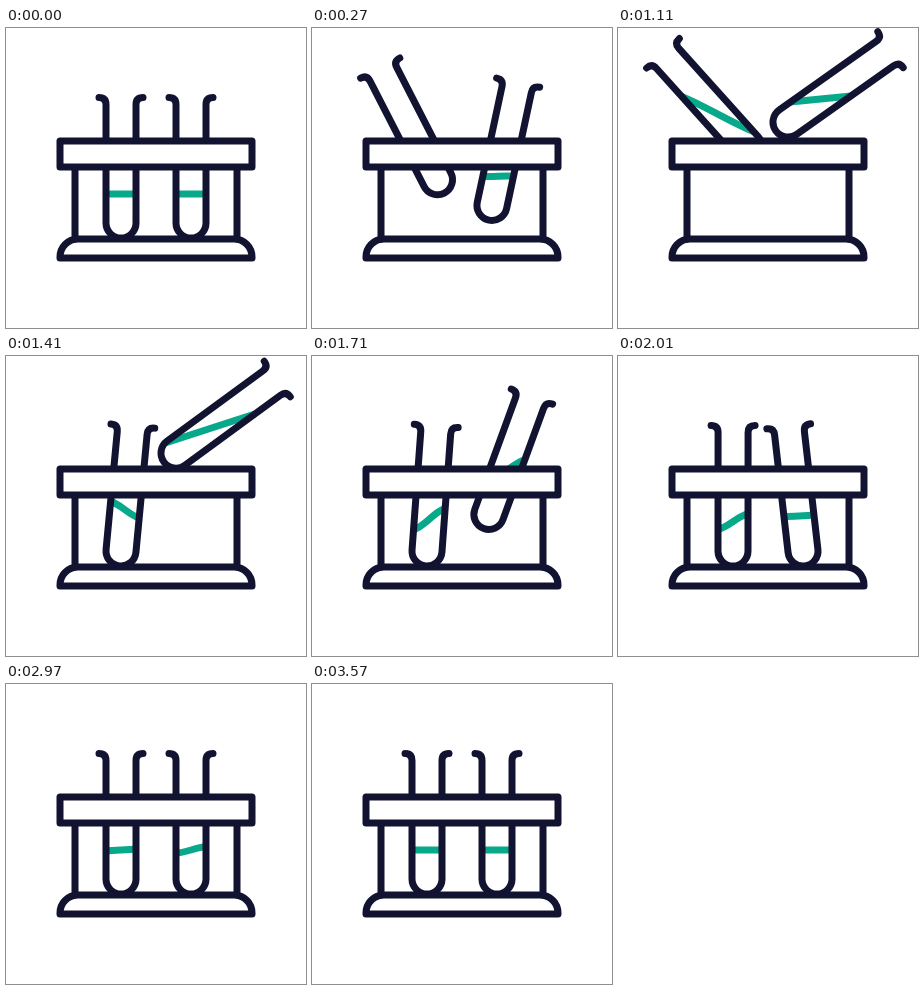
These frames come from a looping animation (300x300 px, 5.13 s). An HTML page:

```html
<!DOCTYPE html>
<html>
<head>
<meta charset="utf-8">
<title>Test tubes</title>
<style>
html, body { margin: 0; height: 100%; overflow: hidden; background: #fff; }
svg { display: block; width: 100%; height: 100%; }
path { fill: none; stroke: #121331; stroke-width: 7; stroke-linecap: round; stroke-linejoin: round; }
.liquid { stroke: #08a88a; stroke-linecap: butt; }
.plate { fill: #fff; }
</style>
</head>
<body>
<svg viewBox="0 0 300 300">
  <defs>
    <path id="glass" d="M-22-125.500q7 0 7 7V0a15 15 0 0 0 30 0V-118.500q0-7 7-7"/>
  </defs>
  <g><g class="tube"><path class="liquid"/><use href="#glass"/></g></g>
  <g transform="translate(300 0) scale(-1 1)"><g class="tube"><path class="liquid"/><use href="#glass"/></g></g>
  <path d="M69 139V211M231 139V211"/>
  <path d="M54 230v-1a18 18 0 0 1 18-18h156a18 18 0 0 1 18 18v1z"/>
  <path class="plate" d="M54 113H246V139H54z"/>
</svg>
<script>
const LOOP = 5130, STEP = 30;
const PEAK = 55, FALL = 885, LAND = 1348, SETTLE = 690;
const LAG = 456, DELAY = 55;

// [time, value] keys
const SLOSH = [[480, 0], [1360, 32], [1810, -42], [2400, 17], [2770, -7], [3114, 0]];
const LEVEL = [[0, 29], [900, 41], [1250, 45], [1710, 32], [2100, 29]];

const wave = u => (1 - Math.cos(Math.PI * u)) / 2;

function track(keys, t) {
  if (t <= keys[0][0]) return keys[0][1];
  for (let i = 1; i < keys.length; i++) {
    const [t0, v0] = keys[i - 1], [t1, v1] = keys[i];
    if (t < t1) return v0 + (v1 - v0) * wave((t - t0) / (t1 - t0));
  }
  return keys[keys.length - 1][1];
}

// Outward lean: swing out, drop back, overshoot, settle
function lean(t) {
  if (t < FALL) return PEAK * (1 - (1 - (t / FALL) ** 1.6) ** 4.2);
  if (t < LAND) return PEAK * (1 - ((t - FALL) / (LAND - FALL)) ** 2);
  const s = t - LAND, top = 110;
  if (s < top) return -7 * Math.sin(Math.PI / 2 * s / top);
  return s < SETTLE ? -7 * (1 - wave((s - top) / (SETTLE - top))) : 0;
}

function pose(tube, t) {
  const a = lean(t), out = Math.max(0, a);
  const lift = out * (t < FALL ? 1.35 + 0.009 * out : 1.82);
  const x = 115 + 15 * Math.sin(out / PEAK * Math.PI / 2);
  tube.setAttribute("transform", `translate(${x} ${195 - lift}) rotate(${-a})`);

  const h = 15 * Math.tan((track(SLOSH, t) + a) * Math.PI / 180);
  const y = -track(LEVEL, t);
  const c = h * (1 / 3 + 0.5 * (1 - Math.abs(a) / PEAK));
  tube.firstChild.setAttribute("d", `M-15 ${y - h}C-5 ${y - c} 5 ${y + c} 15 ${y + h}`);
}

const [left, right] = document.querySelectorAll(".tube");

// The right tube swings out slower, then repeats the left one mirrored and late
function late(t) {
  const turn = FALL + LAG;
  return t < turn ? Math.max(0, t - DELAY) * FALL / (turn - DELAY) : t - LAG;
}

const start = performance.now();
function draw(now) {
  const t = Math.max(0, now - start) % LOOP;
  const step = t - t % STEP;
  pose(left, step);
  pose(right, late(step));
  requestAnimationFrame(draw);
}
draw(start);
</script>
</body>
</html>
```
